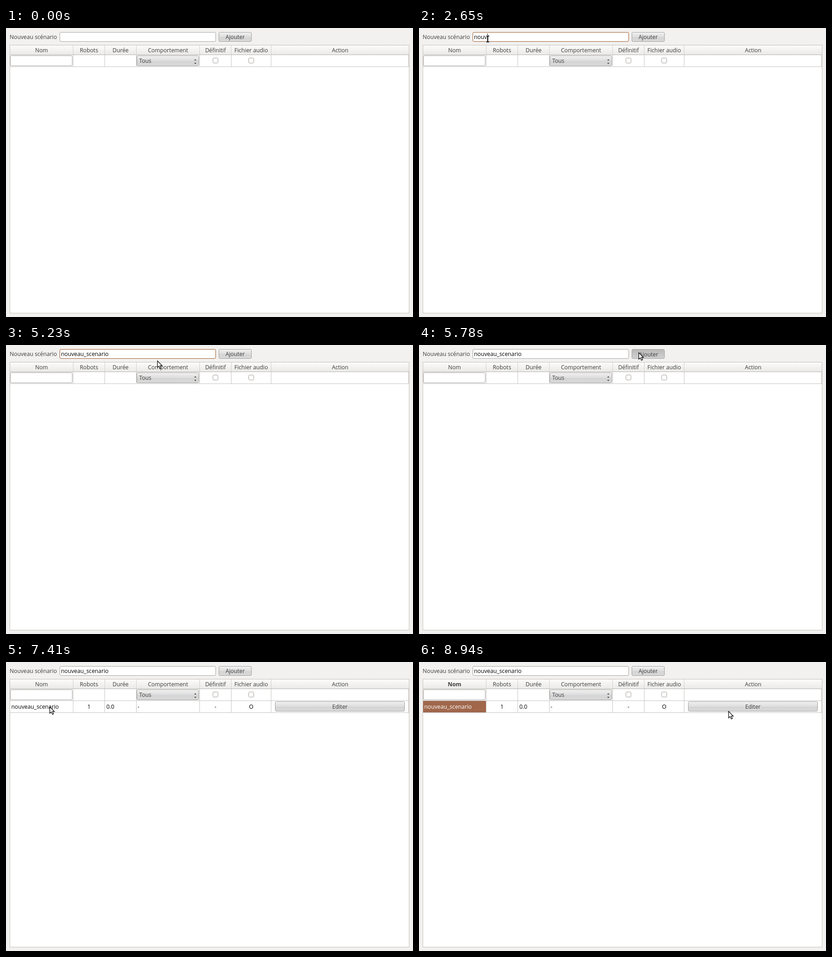
These frames come from a looping animation (888 px wide and 631 px high, 9.69 s). An HTML page:

```html
<!DOCTYPE html>
<html lang="fr">
<head>
<meta charset="utf-8">
<title>Nouveau scénario</title>
<style>
  html, body { margin: 0; width: 100%; height: 100%; overflow: hidden; background: #f2f1f0; }
  svg { display: block; }
  text { font: 12.25px "Open Sans", "Noto Sans", sans-serif; fill: #3c3c3c; white-space: pre; }
  .entry { fill: #000; }
  .mid { text-anchor: middle; }
</style>
</head>
<body>
<svg id="stage" width="888" height="631" viewBox="0 0 888 631">
  <defs>
    <linearGradient id="normal" x2="0" y2="1">
      <stop stop-color="#f0f0f0"/><stop offset=".5" stop-color="#dedede"/>
      <stop offset=".55" stop-color="#d4d4d4"/><stop offset="1" stop-color="#dadada"/>
    </linearGradient>
    <linearGradient id="hover" x2="0" y2="1">
      <stop stop-color="#f5f5f5"/><stop offset=".5" stop-color="#e5e5e5"/>
      <stop offset=".55" stop-color="#dbdbdb"/><stop offset="1" stop-color="#e1e1e1"/>
    </linearGradient>
    <linearGradient id="pressed" x2="0" y2="1">
      <stop stop-color="#b9b9b9"/><stop offset="1" stop-color="#d0d0d0"/>
    </linearGradient>
    <linearGradient id="header" x2="0" y2="1">
      <stop stop-color="#fbfbfa"/><stop offset="1" stop-color="#ebeae8"/>
    </linearGradient>
  </defs>
</svg>
<script>
const LOOP = 9690;
const NAME = "nouveau_scenario";
const svg = document.getElementById("stage");

function add(tag, attrs, parent = svg) {
  const node = document.createElementNS("http://www.w3.org/2000/svg", tag);
  for (const key in attrs) node.setAttribute(key, attrs[key]);
  return parent.appendChild(node);
}
function label(x, y, content, cls = "", parent = svg) {
  const node = add("text", { x, y, class: cls }, parent);
  node.textContent = content;
  return node;
}
const line = (d, stroke, parent) => add("path", { d, stroke, fill: "none" }, parent);
const box = (x, y, width, height, fill, stroke, rx, parent) =>
  add("rect", { x: x + .5, y: y + .5, width: width - 1, height: height - 1, fill, stroke, rx }, parent);
const field = (x, y, w, h) => box(x, y, w, h, "#fff", "#a8a5a2", 2.5);
function button(x, y, w, h, parent) {
  const face = box(x, y, w, h, "url(#normal)", "#a09f9d", 2.5, parent);
  const shine = line(`M${x + 2} ${y + 1.5}h${w - 4}`, "#f8f8f8", parent);
  return { face, shine };
}
const show = (node, on) => node.setAttribute("visibility", on ? "visible" : "hidden");

// Entry bar
label(8, 24, "Nouveau scénario");
const input = field(117, 9, 341, 21);
const typed = label(120, 24, "", "entry");
const caret = add("rect", { y: 12, width: 1, height: 15, fill: "#000" });
const addButton = button(464, 9, 72, 21);
const addLabel = label(500, 24, "Ajouter", "mid");

// Table
const edges = [8, 146, 215, 284, 422, 491, 578, 879];
const titles = ["Nom", "Robots", "Durée", "Comportement", "Définitif", "Fichier audio", "Action"];
box(8, 37, 872, 586, "#fff", "#c3c1bf", 0);
add("rect", { x: 9, y: 38, width: 870, height: 20, fill: "url(#header)" });
const headings = titles.map((title, i) =>
  label((edges[i] + edges[i + 1] + 1) / 2, 53, title, "mid"));
const separators = edges.slice(1, -1);
for (const x of separators) line(`M${x + .5} 38v20`, "#d2d0ce");

function gridRow(y, parent) {
  for (const x of edges.slice(1)) line(`M${x - (x === 879 ? .5 : -.5)} ${y}v26`, "#c6c4c2", parent);
  line(`M9 ${y + 25.5}h870`, "#c6c4c2", parent);
}
gridRow(59);
line("M9 58.5h870", "#b8b4af");
field(9, 60, 136, 23);
button(285, 60, 136, 23);
label(290.5, 76, "Tous");
add("path", { d: "M410.5 71l2.5-3 2.5 3zM410.5 76l2.5 3 2.5-3z", fill: "#4c4c4c" });
for (const x of [451, 529]) box(x, 65, 12, 12, "#fff", "#a19d99", 2);

const row = add("g", {});
gridRow(85, row);
const selection = add("rect", { x: 9, y: 85, width: 137, height: 25, fill: "#a0674b" }, row);
const rowName = label(11.5, 102, NAME, "entry", row);
label(181, 102, "1", "entry mid", row);
label(219, 102, "0.0", "entry", row);
label(287, 102, "-", "entry", row);
label(457, 102, "-", "entry mid", row);
label(535, 102, "O", "entry mid", row);
button(587, 86, 283, 22, row);
label(728.5, 102, "Editer", "mid", row);

// Pointers
const arrow = add("path", {
  d: "M.5 .8V15.2L3.8 12.1 6.3 17.4 8.8 16.2 6.4 11.1H10.7Z",
  fill: "#fff", stroke: "#000", "stroke-width": 1.2
});
const beam = add("g", { fill: "none" });
const beamShape = "M-3 -6.5H-1L0 -5.5 1 -6.5H3M0 -6V6M-3 6.5H-1L0 5.5 1 6.5H3";
add("path", { d: beamShape, stroke: "#fff", "stroke-width": 4 }, beam);
add("path", { d: beamShape, stroke: "#000", "stroke-width": 2 }, beam);

// Each move: start, end, steps, then start point, control point, end point
const moves = [
  { from: 470, to: 1120, steps: 15, path: [[895, 200], [460, 150], [150, 26]] },
  { from: 1580, to: 1580, steps: 1, path: [[150, 26], [150, 25], [150, 24]] },
  { from: 5010, to: 5450, steps: 11, path: [[150, 24], [300, 50], [479, 16]] },
  { from: 6850, to: 6850, steps: 1, path: [[479, 16], [479, 16], [480, 16]] },
  { from: 7010, to: 7410, steps: 9, path: [[480, 16], [300, 70], [94.5, 97]] },
  { from: 7990, to: 8940, steps: 24, path: [[94.5, 97], [370, 219], [675, 107]] }
];
const smooth = p => p * p * (3 - 2 * p);

function pointerAt(t) {
  const move = moves.filter(m => t >= m.from).pop();
  if (!move) return null;
  const gap = (move.to - move.from) / (move.steps - 1) || 1;
  const step = Math.min(move.steps, Math.floor((t - move.from) / gap + 1e-6) + 1);
  const p = smooth(step / move.steps), q = 1 - p, [a, b, c] = move.path;
  return [0, 1].map(i => Math.round(q * q * a[i] + 2 * q * p * b[i] + p * p * c[i]));
}

// Times at which the typed text grows, with its new length
const keys = [
  [2320, 2], [2450, 3], [2650, 4], [2740, 5], [2790, 6], [2930, 7], [3300, 8], [3530, 9],
  [3710, 10], [3780, 11], [3850, 12], [4020, 13], [4070, 14], [4220, 15], [4330, 16]
];
const within = (t, from, to) => t >= from && t < to;

function render(t) {
  const length = keys.reduce((n, [time, count]) => t >= time ? count : n, 0);
  typed.textContent = NAME.slice(0, length);
  caret.setAttribute("x", Math.round(120 + (length ? typed.getComputedTextLength() : 0)));
  show(caret, within(t, 1470, 1890) || within(t, 2320, 4850));
  input.setAttribute("stroke", within(t, 1470, 5780) ? "#a05c2c" : "#a8a5a2");

  const point = pointerAt(t);
  const [x, y] = point || [0, 0];
  const overInput = within(x, 117, 458) && within(y, 9, 30);
  const overButton = within(x, 464, 536) && within(y, 9, 30);
  show(arrow, point && !overInput);
  show(beam, point && overInput);
  for (const pointer of [arrow, beam]) pointer.setAttribute("transform", `translate(${x} ${y})`);

  const pressed = within(t, 5780, 5970);
  addButton.face.setAttribute("fill", `url(#${pressed ? "pressed" : overButton ? "hover" : "normal"})`);
  show(addButton.shine, !pressed);
  addLabel.setAttribute("transform", pressed ? "translate(1 1)" : "");

  const selected = t >= 7570;
  row.style.display = t >= 5920 ? "" : "none";
  selection.style.display = selected ? "" : "none";
  rowName.style.fill = selected ? "#fff" : "#000";
  headings[0].style.fontWeight = selected ? 700 : 400;
}

const start = performance.now();
function tick() {
  render((performance.now() - start) % LOOP);
  requestAnimationFrame(tick);
}
tick();
</script>
</body>
</html>
```
